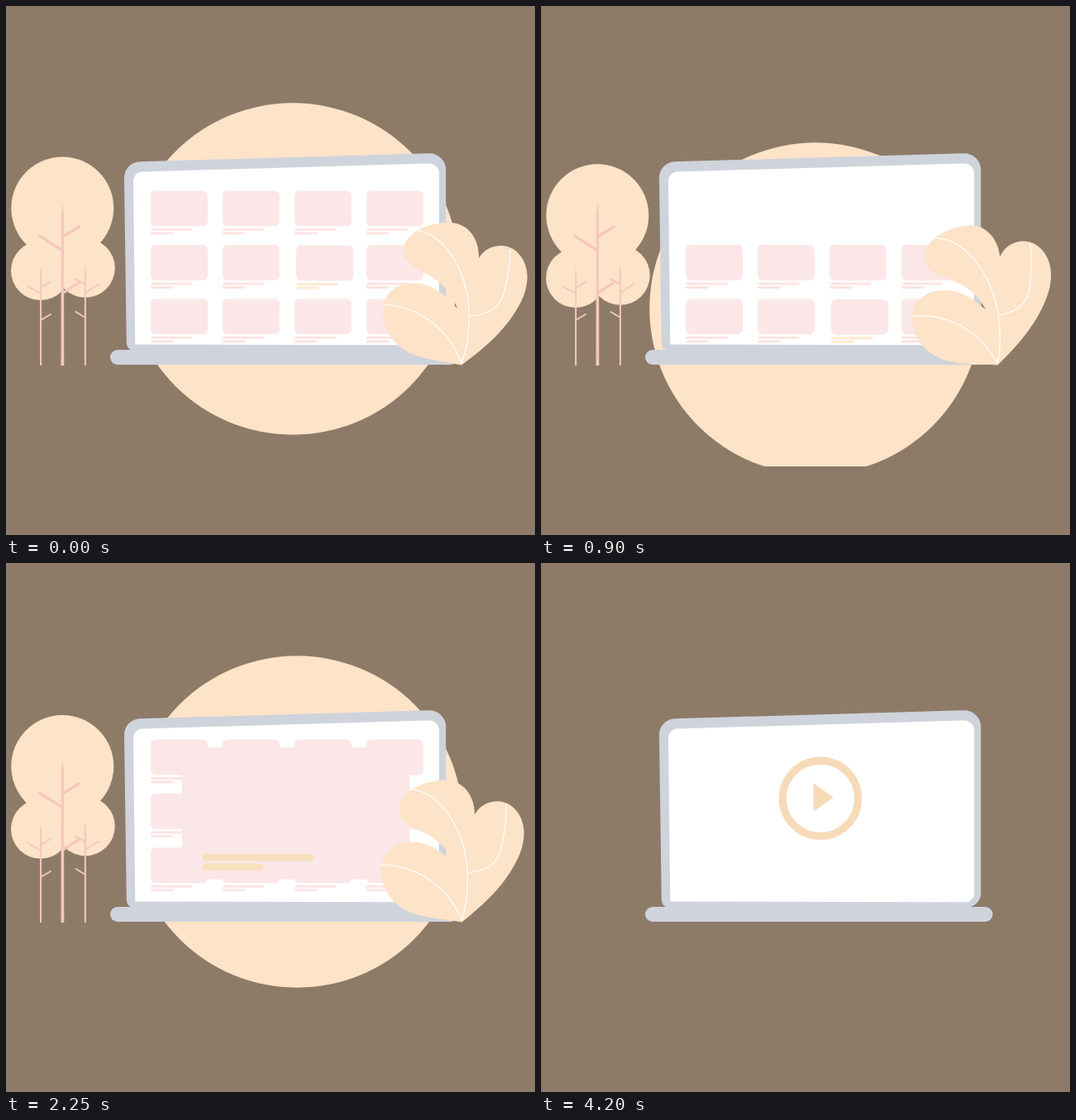
An HTML page for the animation above (4.23 s loop, 640 px wide and 640 px high).

```html
<!DOCTYPE html>
<html lang="en">
<head>
<meta charset="utf-8">
<title>Video library</title>
<style>
  html, body { margin: 0; width: 100%; height: 100%; overflow: hidden; background: #8d7b68; }
  svg { display: block; width: 100%; height: 100%; }
  .peach { fill: #fde3c8; }
  .metal { fill: #cfd3db; }
  .card { fill: #fbe7e7; }
  .line { fill: #fce4e3; }
  .wood { fill: #f6c6be; }
  .twig { fill: none; stroke: #f6c6be; stroke-linecap: round; }
  .vein { fill: none; stroke: #fff; stroke-width: 1.2; }
</style>
</head>
<body>
<svg viewBox="0 0 640 640">
  <defs>
    <clipPath id="stage"><rect width="640" height="557"/></clipPath>
    <clipPath id="screen">
      <path id="glass" d="M154 211A11 11 0 0 1 164.500 200.500L512 190.500A12 12 0 0 1 524 202V400A10 10 0 0 1 514 410.300L156.300 409.500Z"/>
    </clipPath>
  </defs>

  <g class="extra">
    <g clip-path="url(#stage)"><circle id="sun" class="peach" cx="347" cy="318" r="200.700"/></g>
    <g id="crowns" class="peach">
      <circle cx="68.300" cy="244.500" r="62"/>
      <circle cx="41.800" cy="320.300" r="35.800"/>
      <circle cx="96" cy="317" r="35.800"/>
    </g>
    <path class="wood" d="M68.300 237L70 253L70.300 435H66.500L66.800 253ZM42.100 314L43.100 326V435H41.100V326ZM95.900 311L96.900 324V435H94.900V324Z"/>
    <path class="twig" stroke-width="3.200" d="M67 295L41 278.500M70 278L88.500 267M70 346.500L87.500 335"/>
    <path class="twig" stroke-width="2" d="M42 348L26.500 339M42 341L53.500 334M42 380L54 373M96 337L84 330.500M96 347L112 336.500M96 377L84.500 370"/>
  </g>

  <path class="metal" d="M143 208A19.500 19.500 0 0 1 162 188.300L512 178.200A20 20 0 0 1 532.200 198V399A17 17 0 0 1 516 416.500H155Q146 416.500 145.800 407Z"/>
  <rect class="metal" x="126" y="416" width="420.500" height="18" rx="9"/>
  <use href="#glass" fill="#fff"/>

  <g class="extra" clip-path="url(#screen)">
    <g id="grid"></g>
    <rect id="panel" class="card"/>
    <rect id="title"/>
    <rect id="subtitle"/>
  </g>

  <g id="play">
    <circle cx="338" cy="284.800" r="45.700" fill="none" stroke="#f7dbb9" stroke-width="9.200"/>
    <path fill="#f7dbb9" d="M329.500 266.500L354 283.500L329.500 301Z"/>
  </g>

  <g id="leaf" class="extra">
    <path class="peach" d="M551 434.500C531 430 511 429 490 420.500C470 411 456 393 456 370C456 350 470 336 490 335.300C513 334 530 347 546 366C540 349 530 337 514 327C498 318 481 312 481 296C481 277 505 262 536 262C560 262 573 283 572 305C578 295 588 290 599 290C617 290 630.700 307 630.700 328C630.700 340 626 353 622 360C606 390 583 411 551 434.500Z"/>
    <path class="vein" d="M497 271.500C530 275 560 322 560.300 375C560 400 556 420 551 432M560.300 375C585 374 598 365 603 345C608 325 610.500 310 610.500 294M456.500 361.500C495 362 535 388 551 432"/>
  </g>
</svg>
<script>
const LOOP = 4230, STEP = 30, SETTLED = 3600, RESET = 4200;
const $ = id => document.getElementById(id);
const extras = document.querySelectorAll('.extra');

const mix = (a, b, p) => a + (b - a) * p;
const mixAll = (a, b, p) => a.map((v, i) => mix(v, b[i], p));
const progress = (t, from, to) => Math.min(1, Math.max(0, (t - from) / (to - from)));
const smooth = x => (1 - Math.cos(Math.PI * x)) / 2;
const ease = (t, from, to) => smooth(progress(t, from, to));

// Smooth curve through evenly spaced values, x running from 0 to 1.
function spline(values, x) {
  const last = values.length - 1;
  const i = Math.min(last - 1, Math.floor(x * last)), u = x * last - i;
  const [a, b, c, d] = [-1, 0, 1, 2].map(k => values[Math.min(last, Math.max(0, i + k))]);
  return b + u / 2 * (c - a + u * (2 * a - 5 * b + 4 * c - d + u * (3 * (b - c) + d - a)));
}

const driftX = [0, -47, -15, 24, 20, 5, -8, -22, 0];
const driftY = [0, 18, 48, 22, -8, -5, 6.5, 12, 0];

// The crowns dip once between each pair of beats.
const beats = [0, 1320, 2370, 3300];
const crownDip = t => beats.slice(1).reduce(
  (dip, end, i) => dip + 12.5 * Math.sin(Math.PI * progress(t, beats[i], end)) ** 2, 0);

// The leaf leans out steadily and eases back.
function leafAngle(t) {
  const x = (t % 1200) / 600;
  return -16 * (x < 1 ? x : smooth(2 - x));
}

const ROW = 65.4;
const gridScroll = t =>
  -ROW * ease(t, 0, 460) + 2 * ROW * ease(t, 460, 900) - (ROW + 10) * ease(t, 900, 1500);

// Boxes are [x, y, width, height, radius].
function place(el, box) {
  ['x', 'y', 'width', 'height', 'rx'].forEach((name, i) => el.setAttribute(name, box[i]));
}

function addRect(cls, box) {
  const el = document.createElementNS('http://www.w3.org/2000/svg', 'rect');
  el.setAttribute('class', cls);
  place(el, box);
  $('grid').append(el);
}

const cardBoxes = (x, y) => [
  [x, y, 69, 43, 6], [x, y + 45.5, 50.7, 3, 1.5], [x, y + 50, 27.7, 3, 1.5]
];

for (let i = 0; i < 12; i++) {
  const row = Math.floor(i / 4), col = i % 4;
  if (row === 1 && col === 2) continue;
  cardBoxes(175 + col * 87, 223.5 + row * ROW)
    .forEach((box, part) => addRect(part ? 'line' : 'card', box));
}

const chosen = ['panel', 'title', 'subtitle'];
const small = cardBoxes(351.2, 289.4);
const large = [
  [165, 203.5, 347, 200, 30], [198, 361.3, 164.5, 10.4, 5.2], [198, 375.6, 90, 10.4, 5.2]
];

function draw(time) {
  const now = Math.floor(time / STEP) * STEP;
  const blank = now >= RESET;
  const t = Math.min(now, SETTLED);

  extras.forEach(el => { el.style.visibility = blank ? 'hidden' : 'visible'; });
  $('play').style.opacity = blank ? 1 : progress(t, 2400, 2700);

  const drift = [driftX, driftY].map(values => spline(values, t / SETTLED));
  $('sun').setAttribute('transform', `translate(${drift})`);
  $('crowns').setAttribute('transform', `translate(0 ${crownDip(t)})`);
  $('leaf').setAttribute('transform', `rotate(${leafAngle(t)} 551.5 424)`);

  const scroll = gridScroll(t), grow = ease(t, 1800, 2480);
  $('grid').setAttribute('transform', `translate(0 ${scroll})`);
  const tint = `rgb(${mixAll([254, 235, 205], [246, 220, 186], grow).map(Math.round)})`;
  chosen.forEach((id, i) => {
    const box = mixAll(small[i], large[i], grow);
    box[1] += scroll * (1 - grow);
    place($(id), box);
    if (id !== 'panel') $(id).setAttribute('fill', tint);
  });
}

let start;
function tick(now) {
  start ??= now;
  draw((now - start) % LOOP);
  requestAnimationFrame(tick);
}
draw(0);
requestAnimationFrame(tick);
</script>
</body>
</html>
```
